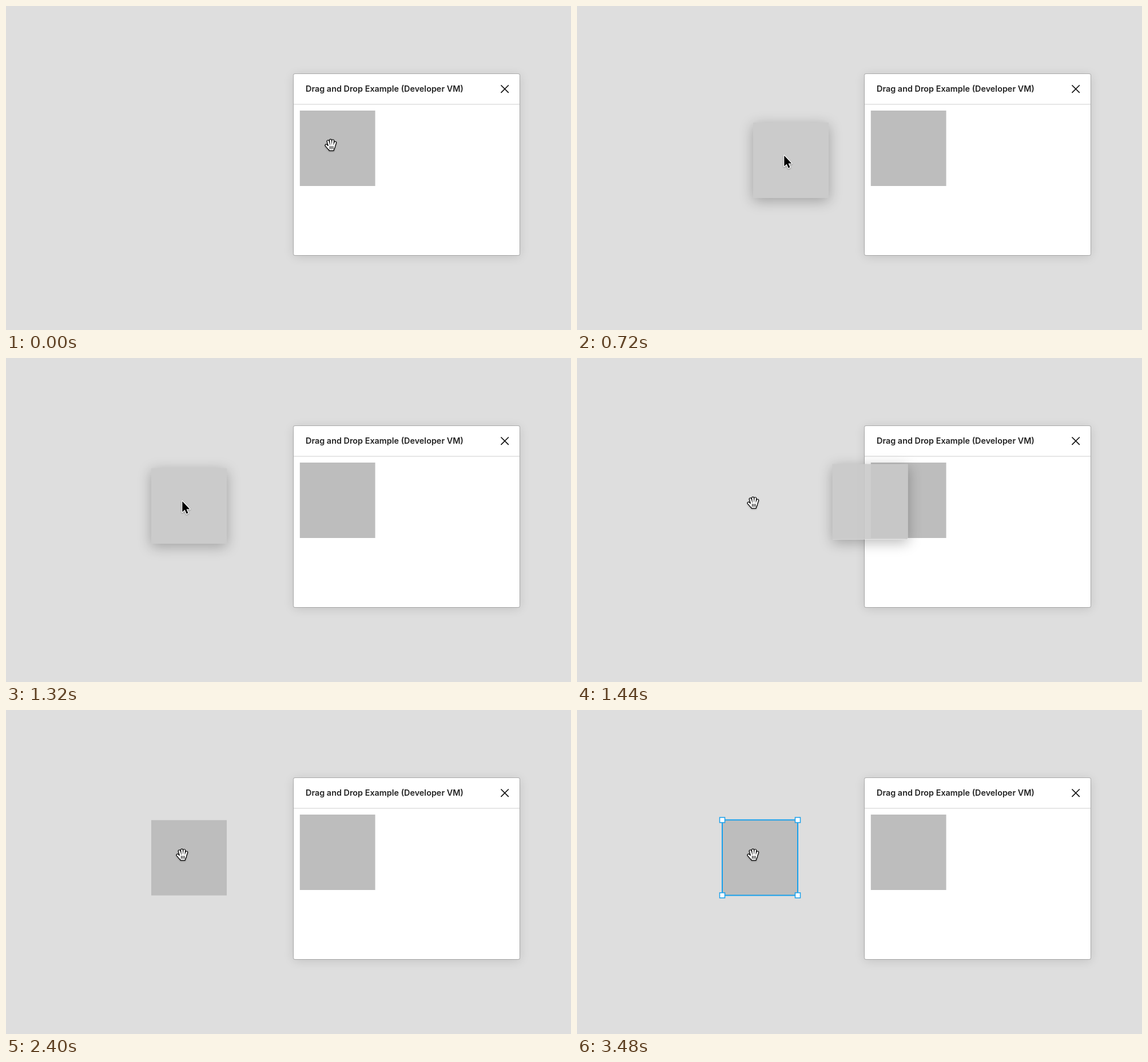
Animation, 988 px wide and 567 px high, one loop 3540 ms. Source, as an HTML page:

```html
<!DOCTYPE html>
<html lang="en">
<head>
<meta charset="utf-8">
<title>Drag and drop</title>
<style>
  html, body { margin: 0; width: 100%; height: 100%; overflow: hidden; background: #dedede; }
  #stage { position: relative; width: 988px; height: 567px; overflow: hidden; background: #dedede; }
  #stage > * { position: absolute; left: 0; top: 0; }
  #dialog {
    transform: translate(503px, 119px);
    width: 395px; height: 317px;
    border-radius: 2.5px;
    background: #fff;
    box-shadow: 0 0 0 1px rgba(0, 0, 0, .2), 0 2.6px 18.5px rgba(0, 0, 0, .13);
  }
  #ghost {
    width: 132px; height: 132px;
    background: rgba(201, 201, 201, .9);
    box-shadow: 0 5px 22px rgba(0, 0, 0, .28);
  }
  svg { display: block; }
  text { font: 600 14.4px Inter, sans-serif; fill: #222; }
  .cursor { filter: drop-shadow(0 1.5px 1.2px rgba(0, 0, 0, .35)); }
  .round { fill: none; stroke-linecap: round; stroke-linejoin: round; }
</style>
</head>
<body>
<div id="stage">
  <svg width="988" height="567">
    <g id="dropped">
      <rect x="254" y="192.7" width="132" height="131.8" fill="#bdbdbd"/>
      <g id="selection" fill="#fff" stroke="#18a0ec" stroke-width="1.5">
        <rect x="254" y="192.4" width="132" height="132" fill="none" stroke-width="2"/>
        <rect x="249.5" y="188" width="9" height="9"/>
        <rect x="381.5" y="188" width="9" height="9"/>
        <rect x="249.5" y="319.8" width="9" height="9"/>
        <rect x="381.5" y="319.8" width="9" height="9"/>
      </g>
    </g>
  </svg>
  <div id="dialog"></div>
  <svg width="988" height="567">
    <text x="524" y="150.4">Drag and Drop Example (Developer VM)</text>
    <path d="M865.5 138.5l13.4 13.4m0-13.4l-13.4 13.4" stroke="#111" stroke-width="1.7" fill="none"/>
    <rect x="503" y="171.4" width="395" height="1.3" fill="#dadada"/>
    <rect x="513.8" y="183" width="131.8" height="132" fill="#bdbdbd"/>
  </svg>
  <div id="ghost"></div>
  <svg width="988" height="567">
    <defs>
      <path id="fingers" d="M-2 3L-4.8-6.6M.5 2L-.5-8.4M3 2L3.7-7.8M5 3.5L7.7-4.4M-3.5 5.5L-8 .4"/>
      <path id="palm" d="M-4 1L6.6 0Q6.5 4.5 4.8 6.6L4.4 8.6H-2.2L-2.8 7Q-4.5 5.5-5.4 4Z"/>
    </defs>
    <g id="hand" class="cursor">
      <g class="round" stroke="#000" stroke-width="5.1">
        <use href="#fingers"/>
        <use href="#palm" stroke-width="3.4"/>
      </g>
      <use href="#fingers" class="round" stroke="#fff" stroke-width="2.7"/>
      <use href="#palm" fill="#fff" stroke="#fff" stroke-width=".8"/>
      <path class="round" d="M-1.4 2v4.2M1.2 2v4.4M3.8 2v4.2" stroke="#000" stroke-width="1.1"/>
    </g>
    <g id="arrow" class="cursor">
      <path d="M0 0V18.9L4.4 14.8L7.3 21.8L10.2 20.5L7.2 13.7H13Z"
            fill="#000" stroke="#fff" stroke-width="2.6" stroke-linejoin="round" paint-order="stroke"/>
    </g>
  </svg>
</div>
<script>
const LOOP = 3540, TICK = 60;
const PICK = 360, DROP = 1380, LANDED = 1620, PLACED = 1920, SELECTED = 3180;
const HOME = [514, 183], TARGET = [254, 193];

// [time, x, y] of the dragged copy's corner
const drag = [
  [PICK, ...HOME], [420, 500, 187], [480, 460, 197], [540, 407, 206], [600, 364, 206],
  [660, 332, 205], [720, 308, 204], [780, 291, 202.5], [840, 278, 201], [900, 267, 199.5],
  [1020, 259, 196.5], [1140, 255, 194], [1200, ...TARGET]
];
const flyBack = [
  [1320, ...TARGET], [1380, 374, 189], [1440, 446.5, 185.5],
  [1500, 487, 184], [1560, 506, 183.3], [LANDED, ...HOME]
];

const el = id => document.getElementById(id);
const ghost = el('ghost'), hand = el('hand'), arrow = el('arrow');
const dropped = el('dropped'), selection = el('selection');

const show = (node, on) => { node.style.display = on ? '' : 'none'; };
const clamp = v => Math.max(0, Math.min(1, v));

function along(keys, t) {
  let i = 0;
  while (i < keys.length - 2 && t > keys[i + 1][0]) i++;
  const [t0, x0, y0] = keys[i], [t1, x1, y1] = keys[i + 1];
  const k = clamp((t - t0) / (t1 - t0));
  return [x0 + (x1 - x0) * k, y0 + (y1 - y0) * k];
}

function draw(now) {
  const t = Math.floor((now % LOOP) / TICK) * TICK;
  const held = along(drag, t);
  const [gx, gy] = t < 1320 ? held : along(flyBack, t);
  const dragging = t >= PICK && t < DROP;

  show(ghost, t >= PICK && t < 1800);
  ghost.style.transform = `translate(${gx}px, ${gy}px)`;
  ghost.style.opacity = 1 - clamp((t - LANDED) / 180);

  // the copy trails the pointer a little on the fast stretch
  const lead = 5 * clamp(1 - Math.abs(t - 540) / 180);
  arrow.setAttribute('transform', `translate(${held[0] + 54.3 - lead} ${held[1] + 57.7})`);
  hand.setAttribute('transform', `translate(${held[0] + 54} ${held[1] + 60.5})`);
  show(arrow, dragging);
  show(hand, !dragging);

  show(dropped, t >= PLACED);
  show(selection, t >= SELECTED);
}

function frame() {
  draw(performance.now());
  requestAnimationFrame(frame);
}
frame();
</script>
</body>
</html>
```
